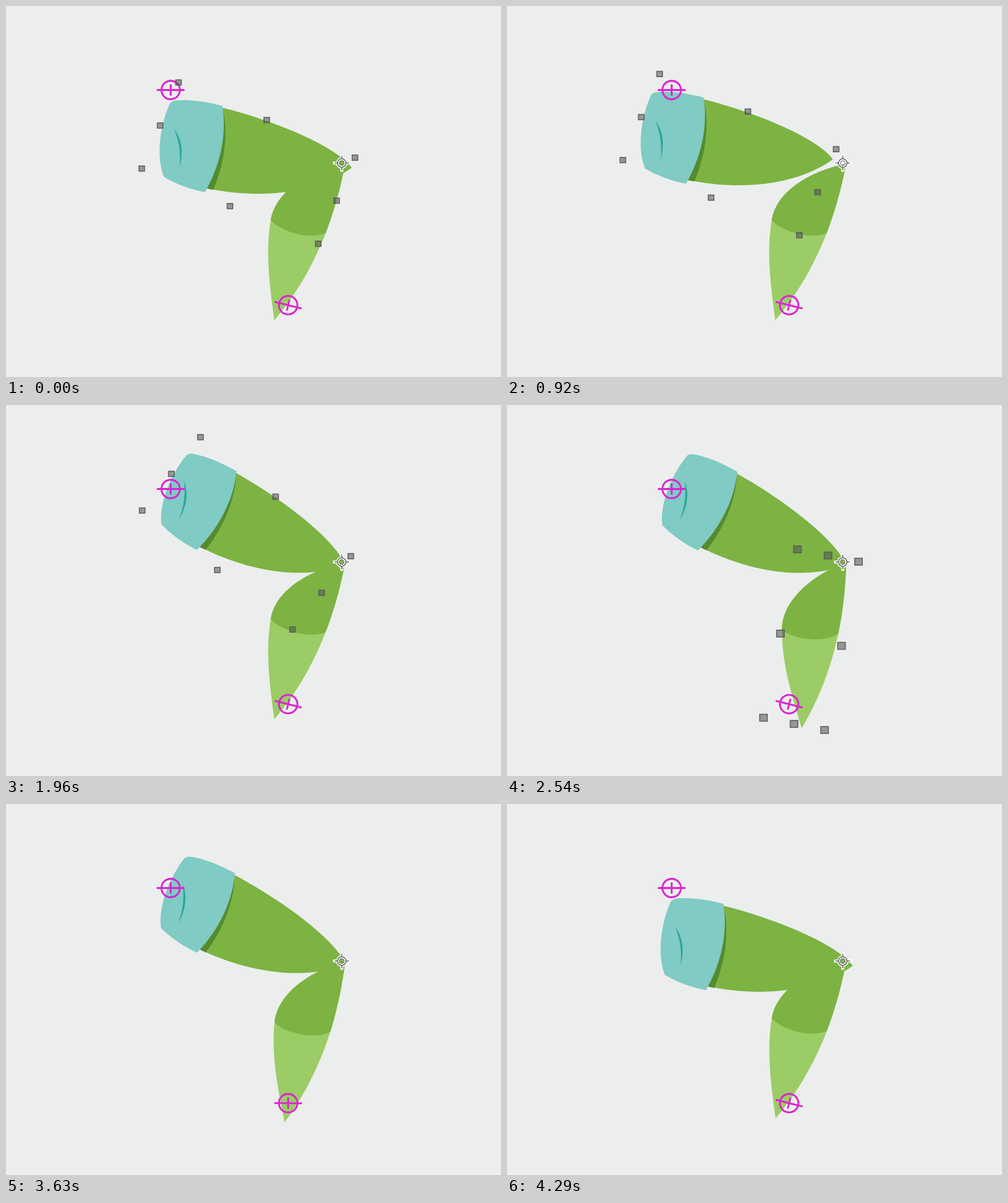
An HTML page that plays this animation: 750x563 px, repeating every 4330 ms.

```html
<!DOCTYPE html>
<html lang="en">
<head>
<meta charset="utf-8">
<title>Leg rig</title>
<style>
  html, body { margin: 0; height: 100%; overflow: hidden; background: #eceeed; }
  svg { display: block; width: 100vw; height: 100vh; }
  .control { fill: none; stroke: #d926d2; stroke-width: 2.8; }
  .handles rect { fill: rgba(80, 80, 80, .55); stroke: #5c5c5c; stroke-width: 1.4; }
</style>
</head>
<body>
<svg viewBox="0 0 750 563">
  <defs>
    <g id="target"><circle r="14"/><path d="M-21 0H21M0-8.5V8.5"/></g>
    <path id="pivot" d="M-6.5 0a6.5 6.5 0 1 0 13 0a6.5 6.5 0 1 0-13 0M-11 0h4.5M11 0h-4.5M0-11v4.5M0 11v-4.5"/>
  </defs>

  <g id="shin">
    <path fill="#9ccc65" d="M513.5 241L511 240C462 250 408 280 401 325C393 375 399 420 406.5 477C462 412 497 330 513.5 241Z"/>
    <path fill="#7cb342" d="M513.5 241L511 240C462 250 408 280 401 325C415 341 458 356 484.5 344.5C497 311 507 276 513.5 241Z"/>
  </g>

  <g id="thigh">
    <path fill="#7cb342" d="M299 142C372 160 470 199 494.5 233C436 275 348 280 274 264Z"/>
    <path fill="#558b2f" d="M298 140C309 180 301 228 284.5 266.5L272 264Z"/>
    <path fill="#80cbc4" d="M219 135Q222 132 226 131C248 128.5 275 133 298.5 139C305 180 297 226 272 270Q239 264 210 247C199 222 201 175 219 135Z"/>
    <path fill="#26a69a" d="M225 173.5Q243 197 233.5 233.5Q237 200 225 173.5Z"/>
  </g>

  <g class="control">
    <use href="#target" x="249.5" y="127.5"/>
    <use href="#target" id="foot"/>
  </g>
  <g transform="translate(508.7 238.3)" fill="none">
    <use href="#pivot" stroke="#fff" stroke-width="4.4" stroke-linecap="square"/>
    <use href="#pivot" stroke="#6b6b6b" stroke-width="1.6"/>
    <circle r="3.6" stroke="#777" stroke-width="1"/>
  </g>
  <g class="handles" id="handles"></g>
</svg>

<script>
const LOOP = 4330, FRAMES = 104;
const KNEE = [509, 238];
const THIGH_REST = 23.1, SHIN_REST = 20.7;
const RAD = Math.PI / 180;
const $ = id => document.getElementById(id);

// Keys are [frame, value, skew]; each segment eases in and out, skew delays it.
const slide = [[0, 9.9], [20, -25], [31, 0], [81, 0], [103, 9.9, 1.35]];
const thighTurn = [[30.5, 23.1], [40.5, 39.1], [50, 38.2], [81, 38.2], [103, 23.1, 1.35]];
const shinTurn = [[52, 20.7], [63, 10.5], [77, 16.7], [81, 16.7], [103, 20.6, 1.35]];
const footTurn = [[78, 14], [79, 0], [85, 0], [103, 14, 1.35]];

const thighBox = { xs: [-285.5, -140.2, 5.2], ys: [-15, 56, 127], w: 8.5, h: 8 };
const shinBox = { xs: [-71.3, -24.1, 23.1], ys: [-4.9, 125.4, 255.7], w: 11.5, h: 10.5 };

const handles = Array.from({ length: 8 }, () =>
  $('handles').appendChild(document.createElementNS('http://www.w3.org/2000/svg', 'rect')));

function valueAt(keys, frame) {
  const next = keys.findIndex(key => key[0] > frame);
  if (next === 0) return keys[0][1];
  if (next < 0) return keys[keys.length - 1][1];
  const [f0, v0] = keys[next - 1], [f1, v1, skew = 1] = keys[next];
  const t = ((frame - f0) / (f1 - f0)) ** skew;
  return v0 + (v1 - v0) * t * t * (3 - 2 * t);
}

function placeHandles({ xs, ys, w, h }, [ox, oy], angle) {
  const c = Math.cos(angle * RAD), s = Math.sin(angle * RAD);
  let i = 0;
  ys.forEach((y, row) => xs.forEach((x, col) => {
    if (row === 1 && col === 1) return;
    const rect = handles[i++];
    rect.setAttribute('x', ox + x * c - y * s - w / 2);
    rect.setAttribute('y', oy + x * s + y * c - h / 2);
    rect.setAttribute('width', w);
    rect.setAttribute('height', h);
  }));
}

function draw(now) {
  const frame = Math.floor((now + 2) % LOOP / LOOP * FRAMES);
  const offset = valueAt(slide, frame);
  const thigh = valueAt(thighTurn, frame);
  const shin = valueAt(shinTurn, frame);
  const hip = [
    KNEE[0] + offset * Math.cos(THIGH_REST * RAD),
    KNEE[1] + offset * Math.sin(THIGH_REST * RAD)
  ];
  $('thigh').setAttribute('transform',
    `translate(${hip}) rotate(${thigh - THIGH_REST}) translate(-488.7 -229.4)`);
  $('shin').setAttribute('transform', `rotate(${shin - SHIN_REST} ${KNEE})`);
  $('foot').setAttribute('transform', `translate(427.5 454) rotate(${valueAt(footTurn, frame)})`);

  $('handles').style.display = frame < 79 ? '' : 'none';
  if (frame < 50) placeHandles(thighBox, hip, thigh);
  else placeHandles(shinBox, KNEE, shin);
}

const start = performance.now();
function tick() {
  draw(performance.now() - start);
  requestAnimationFrame(tick);
}
tick();
</script>
</body>
</html>
```
